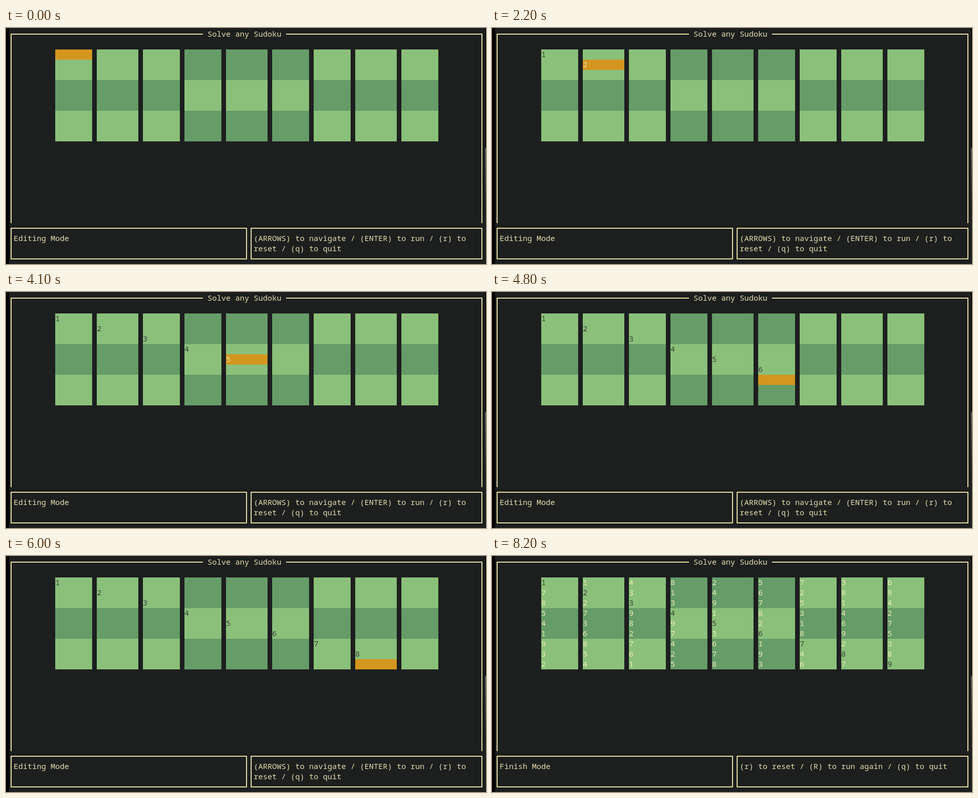
An HTML page for the animation above (8300 ms loop, 936 by 462 pixels).

```html
<!DOCTYPE html>
<html lang="en">
<head>
<meta charset="utf-8">
<title>Sudoku solver</title>
<style>
  html, body { margin: 0; width: 100%; height: 100%; overflow: hidden; background: #1c1f1e; }
  svg { display: block; }
  text {
    font: 500 15px "Noto Sans Mono", "DejaVu Sans Mono", monospace;
    fill: #e8dcae;
    white-space: pre;
  }
  .line { fill: none; stroke: #e6d9a2; stroke-width: 2; }
  #digits text { font-weight: 400; }
  #digits .given { fill: #3a4038; }
  #digits .found { fill: #f0eeb6; }
  #digits .active { fill: #f3e3b8; }
</style>
</head>
<body>
<svg width="936" height="462" viewBox="0 0 936 462">
  <defs>
    <linearGradient id="bar" x1="0" y1="0" x2="0" y2="1">
      <stop offset="0" stop-color="#777975"/>
      <stop offset=".4" stop-color="#50524f"/>
      <stop offset="1" stop-color="#1c1f1e"/>
    </linearGradient>
  </defs>
  <rect width="936" height="462" fill="#1c1f1e"/>
  <rect width="6" height="462" fill="#020202"/>
  <rect x="934" width="2" height="235" fill="#060707"/>
  <rect x="934.5" y="235" width="1.5" height="120" fill="url(#bar)"/>
  <path class="line" d="M10 382V12H384M546 12H928V382M10 392H469V452H10ZM478 392H928V452H478Z"/>
  <text x="393" y="17">Solve any Sudoku</text>
  <g id="board"></g>
  <rect id="cursor" height="20" fill="#d3961f"/>
  <g id="digits"></g>
  <text id="mode" x="15" y="417"></text>
  <text id="help1" x="483" y="417"></text>
  <text id="help2" x="483" y="437"></text>
</svg>
<script>
const LOOP = 8300;
const COL_X = [96, 177, 267, 348, 429, 519, 600, 681, 771];
const TOP = 42, ROW = 20;
const colWidth = c => c % 3 === 1 || c === 7 ? (c === 1 || c === 4 || c === 7 ? 81 : 72) : 72;

// Key presses repeat as: type a digit, down, right.
const KEYS = [
  1500, 1800, 2000, 2200, 2400, 2700, 2900, 3100, 3300,
  3500, 3700, 3800, 4100, 4200, 4400, 4600, 4800, 5000,
  5200, 5400, 5500, 5800, 6000, 6100, 6300
];
const RUN = 6900, FINISH = 7200;
const FIRST = ["149   578", "726   341", "583   962"];
const SOLVED = [
  "114825736", "723146289", "823397514",
  "579418342", "438952167", "162736895",
  "987461723", "356279488", "241583679"
];
const EDIT_HELP = ["(ARROWS) to navigate / (ENTER) to run / (r) to", "reset / (q) to quit"];
const END_HELP = ["(r) to reset / (R) to run again / (q) to quit", ""];

const $ = id => document.getElementById(id);
function add(parent, tag, attrs) {
  const el = document.createElementNS("http://www.w3.org/2000/svg", tag);
  for (const k in attrs) el.setAttribute(k, attrs[k]);
  return parent.appendChild(el);
}

for (let band = 0; band < 3; band++) {
  COL_X.forEach((x, c) => add($("board"), "rect", {
    x, y: TOP + band * 60, width: colWidth(c), height: 60,
    fill: (band + Math.floor(c / 3)) % 2 ? "#669c68" : "#8bc07b"
  }));
}
const cells = Array.from({ length: 81 }, (_, i) => add($("digits"), "text", {
  x: COL_X[i % 9], y: TOP + Math.floor(i / 9) * ROW + 15
}));

function setText(el, value) {
  if (el.textContent !== value) el.textContent = value;
}

function foundDigit(t, r, c) {
  if (t < RUN) return "";
  if (t < RUN + 100) return (FIRST[r] || "")[c] || "";
  if (t < RUN + 200 && r > 5) return "";
  return SOLVED[r][c];
}

function draw(t) {
  const editing = t < RUN;
  const presses = KEYS.filter(k => k <= t).length;
  const row = Math.floor((presses + 1) / 3);
  const col = Math.floor(presses / 3);
  const typed = Math.floor((presses + 2) / 3);

  const cursor = $("cursor");
  cursor.setAttribute("visibility", editing ? "visible" : "hidden");
  cursor.setAttribute("x", COL_X[col]);
  cursor.setAttribute("y", TOP + row * ROW);
  cursor.setAttribute("width", colWidth(col));

  cells.forEach((cell, i) => {
    const r = Math.floor(i / 9), c = i % 9;
    const given = r === c && r < typed;
    const active = editing && r === row && c === col;
    setText(cell, given ? String(r + 1) : foundDigit(t, r, c).trim());
    cell.setAttribute("class", active ? "active" : given ? "given" : "found");
  });

  const help = editing ? EDIT_HELP : t < FINISH ? ["", ""] : END_HELP;
  setText($("mode"), (editing ? "Editing" : t < FINISH ? "Running" : "Finish") + " Mode");
  setText($("help1"), help[0]);
  setText($("help2"), help[1]);
}

const start = performance.now();
function tick() {
  draw((performance.now() - start) % LOOP);
  requestAnimationFrame(tick);
}
tick();
</script>
</body>
</html>
```
